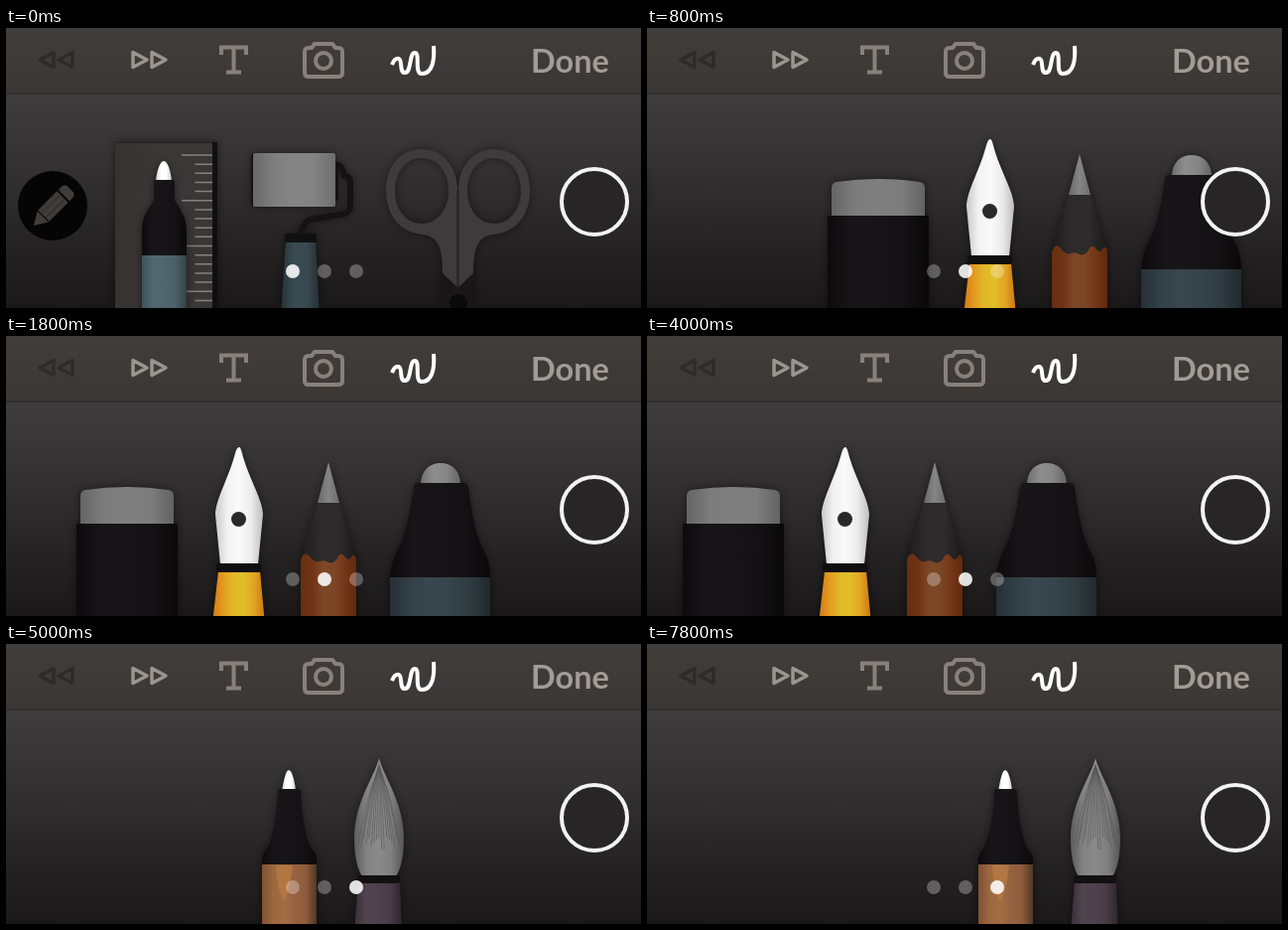
An HTML page that plays this animation: 640x282 px, repeating every 8 s.

```html
<!DOCTYPE html>
<html lang="en">
<head>
<meta charset="utf-8">
<title>Drawing tool tray</title>
<style>
  html, body { margin: 0; width: 100%; height: 100%; overflow: hidden; background: #1c1a1b; }
  svg { display: block; width: 640px; height: 282px; }
  .tool { filter: drop-shadow(0 0 4px #0007); }
  .icon { fill: none; stroke: #88817b; stroke-width: 4; stroke-linejoin: round; }
  .done { font: bold 32.5px Lato, sans-serif; fill: #a29c96; }
</style>
</head>
<body>
<svg viewBox="0 0 640 282">
  <defs id="defs">
    <linearGradient id="tray" x2="0" y2="1">
      <stop stop-color="#3e3c3c"/><stop offset=".35" stop-color="#333131"/>
      <stop offset=".7" stop-color="#252323"/><stop offset="1" stop-color="#1a1819"/>
    </linearGradient>
    <linearGradient id="bar" x2="0" y2="1">
      <stop stop-color="#403d3b"/><stop offset="1" stop-color="#3b3735"/>
    </linearGradient>
  </defs>

  <rect y="66" width="640" height="216" fill="url(#tray)"/>

  <g id="tools">
    <!-- first page -->
    <g transform="translate(-640)">
      <circle cx="47" cy="179" r="35" fill="#060505"/>
      <g transform="translate(28 199) rotate(-45)" fill="#403c39">
        <path d="M0 0L13-8V8Z"/><path d="M14-8H41V8H14Z"/><path d="M43-8H47Q52-8 52-3V3Q52 8 47 8H43Z"/>
        <path d="M14-3H41M14 3H41" stroke="#302d2b"/>
      </g>
      <g class="tool">
        <path d="M110 115H213V290H110Z" fill="url(#ruler)"/>
        <path d="M110 115.5H209" stroke="#242221"/>
        <path d="M208 115H213V290H208Z" fill="#100e0e"/>
        <path id="ticks" stroke="#85817d" stroke-width="1.5"/>
      </g>
      <g class="tool">
        <path d="M151 154C152 144 155 134 159 134S166 144 167 154Z" fill="url(#white)"/>
        <path d="M149 155Q149 153 152 153H167Q170 153 170 155V173C173 180 182 188 182 204V230H137V204C137 188 146 180 149 173Z" fill="url(#black)"/>
        <path d="M137 229H182V290H137Z" fill="url(#teal)"/>
      </g>
      <g class="tool">
        <path d="M332 138C338 137 340 143 341 149Q348 150 347 158V179Q347 185 341 187L307 193Q298 196 297 212" fill="none" stroke="#141213" stroke-width="6"/>
        <path d="M247 130Q247 126 251 126H330V180H251Q247 180 247 176Z" fill="#141213"/>
        <path d="M327 135H335V173H327Z" fill="#141213"/>
        <rect x="249" y="126" width="83" height="54" rx="2" fill="url(#roll)"/>
        <path d="M282 214H312L316 290H277Z" fill="url(#darkteal)"/>
        <rect x="281" y="207" width="32" height="9" rx="2" fill="#111011"/>
      </g>
      <g class="tool">
        <g id="blade">
          <path fill="#3d3b3b" fill-rule="evenodd" d="M419 122C440 122 453 138 455 160L456 264L440 248C440 224 437 210 420 208C398 206 383 190 383 163C383 138 398 122 419 122ZM419 131C402 131 392 146 392 164S403 197 419 197 446 182 446 164 436 131 419 131Z"/>
          <path d="M439 246L456 262V290H441Z" fill="#181617"/>
        </g>
        <use href="#blade" transform="matrix(-1 0 0 1 911 0)"/>
        <path d="M455.5 163V262" stroke="#252324" stroke-width="2"/>
        <circle cx="456" cy="277" r="9" fill="#0b0a0a"/>
      </g>
    </g>

    <!-- second page -->
    <g class="tool">
      <path d="M75 192V161Q75 156 80 155Q122 149 164 155Q169 156 169 161V192Z" fill="url(#rubber)"/>
      <path d="M71 189H173V290H71Z" fill="url(#black)"/>
    </g>
    <g class="tool">
      <path d="M235 112C232 112 231 119 229 125C223 145 211 166 211 180L216 230H254L259 180C259 166 246 145 240 125C238 119 237 112 235 112Z" fill="url(#nib)"/>
      <circle cx="234.500" cy="184.500" r="7.500" fill="#2a2828"/>
      <path d="M214 237H256L261 290H208Z" fill="url(#gold)"/>
      <rect x="212" y="229" width="45" height="9" rx="2" fill="#100f0f"/>
    </g>
    <g class="tool">
      <path d="M314 167L325 127L336 167L353 224V235H297V224Z" fill="url(#lead)"/>
      <path d="M314 168L325 127L336 168Z" fill="url(#graphite)"/>
      <path d="M297 225Q301 216 306 222Q311 229 316 227T325 228Q331 230 335 222Q338 217 342 223Q346 228 349 221Q353 220 353 226V290H297Z" fill="url(#wood)"/>
    </g>
    <g class="tool">
      <path d="M418 150C418 136 426 128 438 128S458 136 458 150Z" fill="url(#dome)"/>
      <path d="M411 152Q411 148 415 148H461Q465 148 466 152C471 190 475 204 482 217Q488 228 488 243H387Q388 228 394 217C401 204 406 188 411 152Z" fill="url(#black)"/>
      <path d="M387 243H488V290H387Z" fill="url(#slate)"/>
    </g>

    <!-- third page -->
    <g transform="translate(640)">
      <g class="tool">
        <path d="M267 148C269 137 271 127 274 127S280 137 281 148Z" fill="url(#white)"/>
        <path d="M263 148Q263 146 265 146H283Q285 146 286 148C288 185 293 202 299 209Q303 214 302 222H247Q246 214 250 209C256 202 261 185 263 148Z" fill="url(#black)"/>
        <path d="M247 222H302V290H247Z" fill="url(#copper)"/>
        <path d="M261 223H278Q275 250 269 259Q262 248 261 223Z" fill="#b77b43" opacity=".75"/>
      </g>
      <g class="tool">
        <path d="M365 115C360 134 340 160 340 195Q340 222 348 234H382Q390 222 390 195C390 160 370 134 365 115Z" fill="url(#bristle)"/>
        <path id="hairs" fill="none" stroke="#505050" stroke-width=".8" opacity=".65"/>
        <path d="M344 239H386L388 290H340Z" fill="url(#plum)"/>
        <rect x="343" y="233" width="43" height="8" rx="2" fill="#121011"/>
      </g>
    </g>
  </g>

  <rect width="640" height="66" fill="url(#bar)"/>
  <path d="M0 66H640" stroke="#332f2e" stroke-width="2"/>

  <g class="icon">
    <g stroke="#2e2b29" stroke-width="3.500"><path d="M48 24.500V39.500L34 32ZM67 24.500V39.500L53 32Z"/></g>
    <g stroke="#9b958f" stroke-width="3.500"><path d="M128 24.500V39.500L142 32ZM147 24.500V39.500L161 32Z"/></g>
    <path d="M217 27V19.500H242V27M229.500 19.500V44M222 44.500H237" stroke-linejoin="miter"/>
    <path d="M305 20H308L311 16H329L332 20H335Q339 20 339 24V45Q339 49 335 49H305Q301 49 301 45V24Q301 20 305 20Z"/>
    <circle cx="320" cy="33" r="8"/>
    <path d="M389 37C391 32 393 30 396 31C400 33 396 45 402 45C409 45 406 25 412 25C418 25 411 46 419 46C430 46 432 32 431 18" stroke="#fff"/>
  </g>
  <text class="done" x="529" y="44.500">Done</text>

  <g id="dots" fill="#fff">
    <circle cx="289" cy="245" r="7"/><circle cx="321" cy="245" r="7"/><circle cx="353" cy="245" r="7"/>
  </g>
  <circle cx="593" cy="175" r="33" fill="#272525" stroke="#f4f3f3" stroke-width="4"/>
</svg>

<script>
const $ = id => document.getElementById(id);

// Left-to-right shading, as evenly spaced colours.
const shades = {
  ruler: '#353231 #3b3837 #393635',
  white: '#d4d4d4 #fff #fff #c8c8c8',
  black: '#0c0a0b #171517 #161416 #131113 #0a0909',
  teal: '#3f5159 #526871 #50656e #4c6068 #334148',
  roll: '#686868 #7e7e7e #858585 #828282 #6d6d6d',
  darkteal: '#263238 #3a4a51 #394950 #242f34',
  rubber: '#656565 #7c7c7c #7f7f7f #7d7d7d #626262',
  nib: '#c9c9c9 #f2f2f2 #fafafa #ececec #bebebe',
  gold: '#d47a14 #e39a20 #e0b927 #e2bd29 #e0a323 #cf7415',
  lead: '#1d1b1b #2c2a2a #2d2b2b #1b1919',
  graphite: '#686868 #858585 #6c6c6c',
  wood: '#672e10 #703414 #7c4727 #7b4626 #733616 #61290e',
  dome: '#707070 #8e8e8e #858585 #656565',
  slate: '#263035 #334047 #3a474e #36434a #2f3b41 #20292d',
  copper: '#805132 #9b673f #a36d43 #966140 #8f5c3b #503728',
  bristle: '#5d5d5d #828282 #8a8a8a #7f7f7f #555',
  plum: '#382f37 #50444e #4d414b #483c46 #2d252b'
};
$('defs').innerHTML += Object.entries(shades).map(([id, list]) => {
  const colors = list.split(' ');
  const stops = colors.map((c, i) => `<stop offset="${i / (colors.length - 1)}" stop-color="${c}"/>`);
  return `<linearGradient id="${id}">${stops.join('')}</linearGradient>`;
}).join('');

let ticks = '', hairs = '';
for (let i = 0; i < 17; i++) ticks += `M${i % 5 ? 190.5 : 177} ${128 + i * 9.15}H208`;
for (let i = -8; i <= 8; i++) {
  const end = 195 + (i * i * 7 + i * 5) % 13;
  hairs += `M${365 + i * .25} ${121 + Math.abs(i)}Q${365 + i * 1.6} 155 ${365 + i * 2.6} ${end}`;
}
$('ticks').setAttribute('d', ticks);
$('hairs').setAttribute('d', hairs);

// Scroll positions at successive steps: two swipes with a slight overshoot, then a drag back.
const STEP = 200, LOOP = 8000;
const moves = [
  [0, [0, 50, 190, 370, 529, 633, 643, 642, 641, 640]],
  [4000, [675, 765, 885, 1021, 1175, 1269, 1282, 1283, 1282, 1280]],
  [7800, [1193]]
];

function scrollAt(time) {
  const [start, path] = moves.findLast(move => time >= move[0]);
  return path[Math.min(Math.floor((time - start) / STEP), path.length - 1)];
}

const began = performance.now();
function draw() {
  const scroll = scrollAt((performance.now() - began) % LOOP);
  $('tools').setAttribute('transform', `translate(${640 - scroll})`);
  const page = Math.round(scroll / 640);
  [...$('dots').children].forEach((dot, i) => dot.setAttribute('opacity', i === page ? .87 : .29));
  requestAnimationFrame(draw);
}
draw();
</script>
</body>
</html>
```
